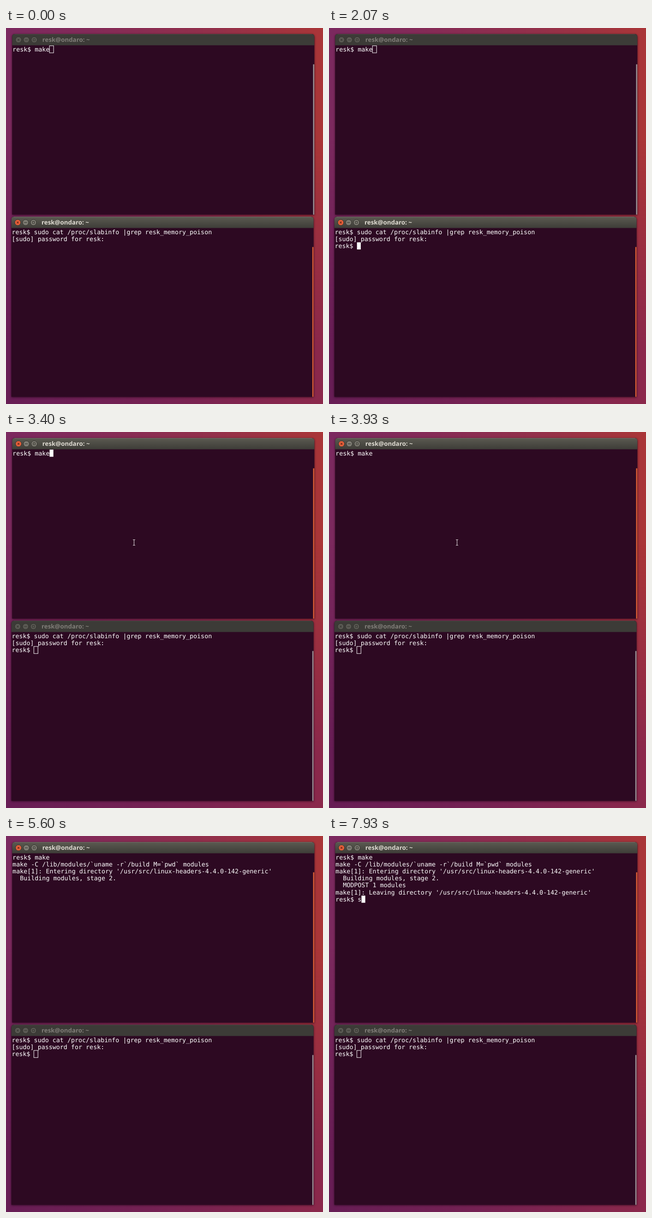
These frames come from a looping animation (687 by 815 pixels, 8000 ms). An HTML page:

```html
<!DOCTYPE html>
<html lang="en">
<head>
<meta charset="utf-8">
<title>Two terminals</title>
<style>
  html, body { margin: 0; width: 100%; height: 100%; overflow: hidden; }
  body {
    position: relative;
    background: linear-gradient(93deg, #7b295f 0%, #832a58 25%, #93304a 62%, #a83539 92%, #ad3734 100%);
  }
  body::before {
    content: ""; position: absolute; inset: 0;
    background: linear-gradient(90deg, #671d55 0%, #742153 45%, #8b284b 100%);
    -webkit-mask-image: linear-gradient(transparent 30%, #000 85%);
    mask-image: linear-gradient(transparent 30%, #000 85%);
  }
  svg { position: absolute; left: 0; top: 0; display: block; }
  text { white-space: pre; text-rendering: geometricPrecision; }
  .frame { filter: drop-shadow(0 1px 2px rgba(20, 0, 12, .65)); }
  .title { font: bold 13.3px "Open Sans", "Noto Sans", sans-serif; }
  .line { font: 13.35px "DejaVu Sans Mono", monospace; fill: #fff; }
</style>
</head>
<body>
<svg id="stage" width="687" height="815" viewBox="0 0 687 815">
  <defs>
    <linearGradient id="bar" x2="0" y2="1">
      <stop offset="0" stop-color="#5b5a51"/>
      <stop offset="1" stop-color="#3e3d38"/>
    </linearGradient>
  </defs>
</svg>
<script>
const LOOP = 8000, CELL = 8.037, ROW = 15.17, BLINK = 600;
const FOCUS = 3270, ENTER = 4870, PROMPT = 2070;
const stage = document.getElementById('stage');

function add(parent, tag, attrs, text) {
  const el = document.createElementNS('http://www.w3.org/2000/svg', tag);
  set(el, attrs);
  if (text) el.textContent = text;
  parent.appendChild(el);
  return el;
}

function set(el, attrs) {
  for (const key in attrs) el.setAttribute(key, attrs[key]);
}

function makeTerminal(x, y, w, h, rows) {
  const root = add(stage, 'g', { transform: `translate(${x} ${y})` });
  const frame = add(root, 'g', { class: 'frame' });
  add(frame, 'path', { d: `M0 ${h}V6Q0 0 6 0H${w - 6}Q${w} 0 ${w} 6V${h}Z`, fill: '#2d0922' });
  const bar = add(root, 'path', { d: `M0 24.5V6Q0 0 6 0H${w - 6}Q${w} 0 ${w} 6V24.5Z` });
  const shine = add(root, 'path', { d: `M5 .5H${w - 5}`, stroke: '#706f66', 'stroke-width': 1 });
  const icons = ['M-2 -2L2 2M2 -2L-2 2', 'M-3 0H3', 'M-2.2 -2.2H2.2V2.2H-2.2Z'];
  const buttons = icons.map((d, i) => {
    const g = add(root, 'g', { transform: `translate(${13.8 + i * 17} 12.6)` });
    const disc = add(g, 'circle', { r: 6.4, 'stroke-width': 1 });
    const icon = add(g, 'path', { d, fill: 'none', 'stroke-width': 1.1 });
    return { disc, icon };
  });
  const title = add(root, 'text', { class: 'title', x: 65.5, y: 17.3 }, 'resk@ondaro: ~');
  const scroll = add(root, 'rect', { x: w - 2.8, y: 65.7, width: 2.6, height: h - 65.7 });
  const body = add(root, 'g', { transform: 'translate(.8 25.2)' });
  const cursor = add(body, 'rect', {});
  const lines = Array.from({ length: rows }, (_, i) =>
    add(body, 'text', { class: 'line', x: 0, y: 12.6 + i * ROW }));

  let wasActive;
  function setActive(active) {
    if (active === wasActive) return;
    wasActive = active;
    set(bar, { fill: active ? 'url(#bar)' : '#3c3b37' });
    set(shine, { opacity: active ? 1 : .25 });
    set(title, { fill: active ? '#dfdbd2' : '#807d78' });
    set(scroll, { fill: active ? '#dc5d35' : '#9b9196' });
    buttons.forEach(({ disc, icon }, i) => {
      const lit = i ? '#7d7b72' : '#e45f3a';
      set(disc, { fill: active ? lit : '#5a5953', stroke: active ? '#35342f' : '#33322e' });
      set(icon, { stroke: active && !i ? '#5c2015' : '#35342f' });
    });
  }

  // mode: 'solid', 'hollow' or 'none'
  function show(active, content, mode) {
    setActive(active);
    lines.forEach((el, i) => {
      const s = content[i] || '';
      if (el.textContent !== s) el.textContent = s;
    });
    const row = content.length - 1, cx = content[row].length * CELL, cy = row * ROW;
    const hollow = mode === 'hollow';
    set(cursor, {
      x: hollow ? cx - .3 : cx, y: hollow ? cy + .3 : cy,
      width: hollow ? CELL + .9 : CELL + .2, height: hollow ? ROW + .2 : ROW + .3,
      fill: hollow ? 'none' : '#fff', stroke: hollow ? '#fff' : 'none',
      visibility: mode === 'none' ? 'hidden' : 'visible'
    });
  }
  return show;
}

const upper = makeTerminal(13.3, 13, 655, 391.5, 7);
const lower = makeTerminal(11.6, 409, 655, 390.5, 3);
const pointer = add(stage, 'path', {
  d: 'M-2.5 -6H2.5M0 -6V6M-2.5 6H2.5', fill: 'none', stroke: '#dcd5d9', 'stroke-width': 1.1
});

const dir = "directory '/usr/src/linux-headers-4.4.0-142-generic'";
const output = [
  [ENTER, 'make -C /lib/modules/`uname -r`/build M=`pwd` modules'],
  [4920, 'make[1]: Entering ' + dir],
  [5530, '  Building modules, stage 2.'],
  [5670, '  MODPOST 1 modules'],
  [5870, 'make[1]: Leaving ' + dir]
];
const request = ['resk$ sudo cat /proc/slabinfo |grep resk_memory_poison', '[sudo] password for resk: '];
const keys = [FOCUS, ENTER, 7870];

// Pointer stops [time, x, y]; it hides while keys are pressed.
const trips = [
  [[130, 400, 785], [670, 371, 541], [1000, 371, 541], [1130, 370.5, 539.5], [1400, 370.5, 539.5]],
  [[2470, 375, 539], [2670, 372, 515], [3070, 277.5, 241], [3130, 277.5, 240.5], [3400, 277.5, 239.5], [ENTER, 277.5, 239.5]]
];

function pointerAt(t) {
  for (const trip of trips) {
    for (let i = 1; i < trip.length; i++) {
      const [t0, x0, y0] = trip[i - 1], [t1, x1, y1] = trip[i];
      if (t < t0 || t >= t1) continue;
      const u = (t - t0) / (t1 - t0), k = u * u * (3 - 2 * u);
      return [x0 + (x1 - x0) * k, y0 + (y1 - y0) * k];
    }
  }
  return null;
}

function blink(t, since) {
  return Math.floor((t - since) / BLINK) % 2 ? 'none' : 'solid';
}

function upperText(t) {
  const content = ['resk$ make'];
  for (const [at, line] of output) if (t >= at) content.push(line);
  if (t >= 5870) content.push(t >= 7870 ? 'resk$ s' : 'resk$ ');
  else if (t >= ENTER) content.push('');
  return content;
}

function draw(t) {
  const top = t >= FOCUS;
  const lastKey = keys.filter(k => k <= t).pop();
  upper(top, upperText(t), top ? blink(t, lastKey) : 'hollow');
  const asked = t < PROMPT;
  lower(!top, asked ? request : [...request, 'resk$ '],
    asked ? 'none' : top ? 'hollow' : blink(t, PROMPT));
  const at = pointerAt(t);
  set(pointer, { visibility: at ? 'visible' : 'hidden' });
  if (at) set(pointer, { transform: `translate(${at[0]} ${at[1]})` });
}

function tick() {
  draw(performance.now() % LOOP);
  requestAnimationFrame(tick);
}
tick();
</script>
</body>
</html>
```
